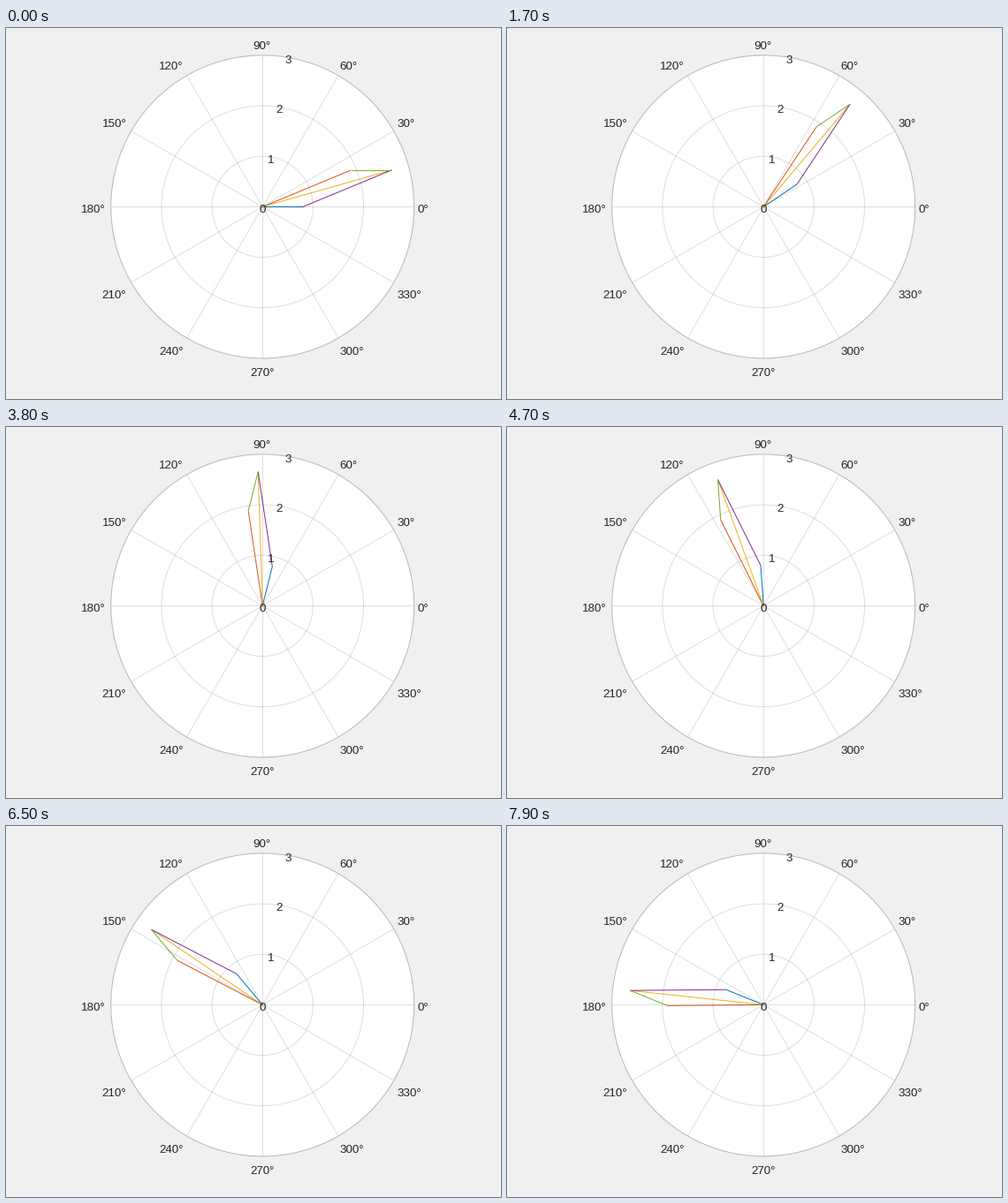
Recreate the animation shown at these times as a matplotlib script. Size 560 by 420 pixels, loop 8 s.

```python
import numpy as np
import matplotlib.pyplot as plt
from matplotlib.animation import FuncAnimation
from matplotlib.patches import Circle

W, H, DPI = 560, 420, 100
FRAMES, STEP_MS = 80, 100
CX, CY, UNIT = 290.2, 202.4, 171.5 / 3
PX = 72 / DPI  # one pixel in points
INK = "#262626"
BLUE, ORANGE, YELLOW, PURPLE, GREEN = (
    "#0072bd", "#d95319", "#edb120", "#7e2f8e", "#77ac30")

fig = plt.figure(figsize=(W / DPI, H / DPI), dpi=DPI, facecolor="#f0f0f0")
ax = fig.add_axes([0, 0, 1, 1])
ax.set(xlim=(0, W), ylim=(H, 0))
ax.axis("off")


def polar(r, deg):
    """Stage position of a polar point."""
    a = np.radians(deg)
    return np.array([CX + UNIT * r * np.cos(a), CY - UNIT * r * np.sin(a)])


def label(x, y, text, ha="center"):
    ax.text(x, y + 5.3, text, ha=ha, va="baseline", color=INK, zorder=5,
            family="Liberation Sans", size=13.33 * PX)


def ring(r, **style):
    ax.add_patch(Circle((CX, CY), r * UNIT, lw=PX, **style))


# Disc and grid
ring(3, fc="white", ec="none", zorder=1)
for deg in range(0, 360, 30):
    ax.plot(*np.transpose([(CX, CY), polar(3, deg)]), color=INK, alpha=0.15,
            lw=PX, solid_capstyle="butt", zorder=3)
for r in (1, 2):
    ring(r, fc="none", ec=INK, alpha=0.15, zorder=3)
ring(3, fc="none", ec="#b8b8b8", zorder=3)

# Angle labels
for deg in range(0, 360, 30):
    c, s = np.cos(np.radians(deg)), np.sin(np.radians(deg))
    side = 0 if abs(c) < 1e-6 else np.sign(c)
    lift = 0 if abs(s) < 1e-6 else 9 * np.sign(s)
    x = CX + 176 * c - (1.5 if side < 0 else 0.4)
    label(x, CY + 1.1 - 176 * s - lift, f"{deg}°",
          {0: "center", 1: "left", -1: "right"}[int(side)])

# Radius labels along the 80 degree ray
for r in range(4):
    x, y = polar(r, 80)
    label(x - 0.5, y + 1.1, str(r))

lines = [ax.plot([], [], color=c, lw=PX, solid_capstyle="butt", zorder=2)[0]
         for c in (BLUE, ORANGE, YELLOW, PURPLE, GREEN)]


def update(i):
    turn = 2 * i
    origin = polar(0, 0)
    a = polar(0.8, turn)
    b = polar(1.9, turn + 22.5)
    total = a + b - origin
    ends = [(origin, a), (origin, b), (origin, total), (a, total), (b, total)]
    for line, pts in zip(lines, ends):
        line.set_data(*np.transpose(pts))
    return lines


anim = FuncAnimation(fig, update, frames=FRAMES, interval=STEP_MS,
                     repeat=True, repeat_delay=0)
plt.show()
```
